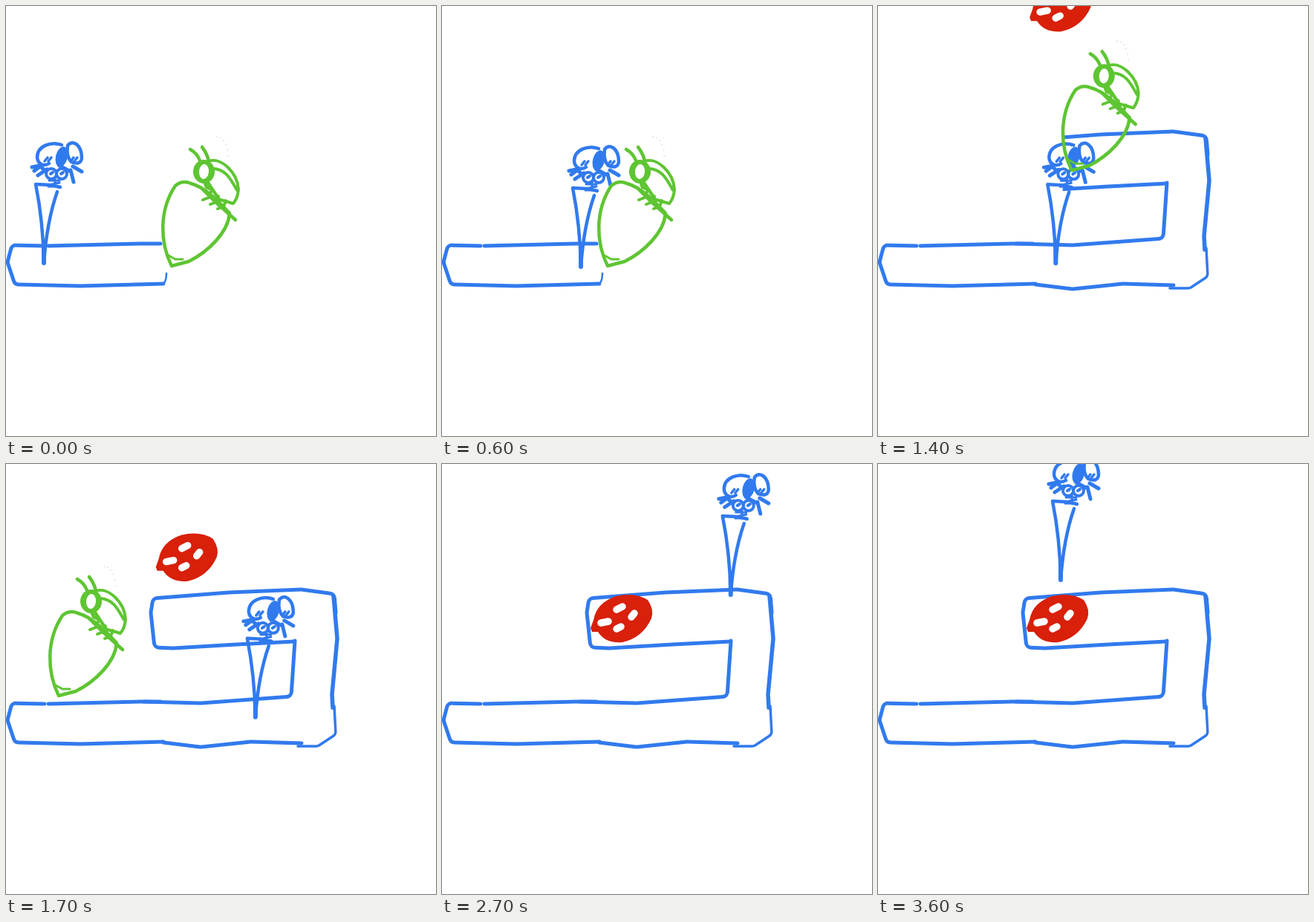
These frames come from a looping animation (579x579 px, 3700 ms). An HTML page with a canvas:

```html
<!DOCTYPE html>
<html lang="en">
<head>
<meta charset="utf-8">
<title>Bug, fly and pipe</title>
<style>
html, body { margin: 0; width: 100%; height: 100%; overflow: hidden; background: #fff; }
canvas { display: block; }
</style>
</head>
<body>
<canvas id="stage" width="579" height="579"></canvas>
<script>
const SIZE = 579, STEP = 100, STEPS = 37;
const BLUE = '#317aee', GREEN = '#5ec532', RED = '#d8200a', WHITE = '#fff';
const ctx = document.getElementById('stage').getContext('2d');

// Each leg is a Bezier curve through its control points, ending at step `end`.
const flyLegs = [
  { end: 6, curve: [[0, 0], [45, -85], [90, 85], [136, 5]] },
  { end: 12, curve: [[136, 5], [124, 4]] },
  { end: 18, curve: [[124, 4], [317, -7]] },
  { end: 24, curve: [[317, -7], [378, -36], [366, -96]] },
  { end: 30, curve: [[366, -96], [354, -231], [277, -122]] },
  { end: 36, curve: [[277, -122], [195, -190]] }
];
const bugLegs = [
  { end: 6, curve: [[0, 0]] },
  { end: 11, curve: [[0, 0], [230, 20], [183, -147]] },
  { end: 17, curve: [[183, -147], [60, -165], [-152, -38]] },
  { end: 20, curve: [[-152, -38], [-197, 124], [-250, 420]] }
];
const ballLegs = [
  { end: 13, curve: [[3, -165]] },
  { end: 19, curve: [[3, -165], [-2, 82]] }
];

const mix = (a, b, k) => a + (b - a) * k;

function bezier(points, k) {
  while (points.length > 1) {
    points = points.slice(1).map(([x, y], i) => [mix(points[i][0], x, k), mix(points[i][1], y, k)]);
  }
  return points[0];
}

function position(legs, step) {
  let start = 0;
  for (const { end, curve } of legs) {
    if (step <= end) return bezier(curve, (step - start) / (end - start));
    start = end;
  }
  return legs[legs.length - 1].curve.slice(-1)[0];
}

function stroke(path, color, width) {
  ctx.strokeStyle = color;
  ctx.lineWidth = width;
  ctx.stroke(path);
}

const line = (d, color, width = 4.5) => stroke(new Path2D(d), color, width);

// A polyline with softened corners
function tube(points, width = 5, radius = 7) {
  const path = new Path2D();
  path.moveTo(...points[0]);
  for (let i = 1; i < points.length - 1; i++) path.arcTo(...points[i], ...points[i + 1], radius);
  path.lineTo(...points[points.length - 1]);
  stroke(path, BLUE, width);
}

function oval(x, y, rx, ry, color, turn = 0) {
  ctx.fillStyle = color;
  ctx.beginPath();
  ctx.ellipse(x, y, rx, ry, turn, 0, Math.PI * 2);
  ctx.fill();
}

function placed([x, y], draw) {
  ctx.save();
  ctx.translate(x, y);
  draw();
  ctx.restore();
}

function clipped(x, y, width, draw) {
  ctx.save();
  ctx.beginPath();
  ctx.rect(x, y, width, SIZE);
  ctx.clip();
  draw();
  ctx.restore();
}

function drawBase() {
  tube([[208, 320], [180, 320], [57, 323]]);
  tube([[52, 323], [8, 322], [2, 345], [12, 375], [100, 377], [212, 374]]);
}

function drawElbow() {
  tube([[186, 320], [262, 322], [384, 313], [389, 238]]);
  tube([[212, 375], [262, 381], [330, 374], [398, 376]]);
  tube([[393, 380], [420, 380], [444, 364], [442, 326]], 3.5);
  tube([[440, 328], [439, 310], [446, 235], [441, 178]], 5.5);
}

const drawRiser = () => tube([[389, 238], [384, 200], [384, 172], [396, 170]]);

const drawTop = () => tube([[444, 200], [442, 175], [397, 169], [300, 173], [198, 181],
  [195, 200], [200, 247], [225, 248], [310, 243], [388, 239]]);

// The pipe grows behind the bug.
function drawPipe(step, [x, y]) {
  drawBase();
  if (step <= 6) {
    line('M212 374Q216 370 216 360', BLUE, 2.5);
  } else if (step <= 12) {
    clipped(0, y + 310, 212 + x * 1.35, () => { drawElbow(); drawRiser(); });
  } else {
    drawElbow();
    clipped(x + 211, 0, SIZE, drawTop);
  }
}

function drawFly() {
  line('M73 244L60 241L40 240Q50 290 51 346Q55 290 69 250', BLUE);
  line('M51 320V346', BLUE, 6);
  line('M75 187C61 182 42 188 42 204C43 214 52 216 58 212', BLUE);
  line('M83 188C90 179 102 187 102 205C101 212 95 213 88 210C82 204 82 195 83 188', BLUE);
  oval(75, 203, 8, 14, BLUE, 0.25);
  for (const x of [52, 57, 87, 92]) line(`M${x} 209l4 -5`, BLUE, 3.5);
  for (const x of [61, 75]) {
    line(`M${x - 7} 226a7 7 0 1 1 14 0a7 7 0 1 1 -14 0m6 0l3 -2`, BLUE, 4);
  }
  line('M35 217L45 215L52 221M38 222L46 216M43 228L55 220', BLUE, 5);
  line('M90 216L102 223M87 221L91 237M72 215L85 222', BLUE, 5);
  line('M58 235H72M62 240L72 238M57 243H72M66 231V239', BLUE, 3);
}

function drawBug() {
  line('M228 242Q238 234 249 239C268 244 285 262 301 279C299 305 272 331 246 344L223 350C207 318 206 275 228 242Z', GREEN);
  line('M219 336L228 341H238', GREEN, 3);
  line('M267 236L270 244L277 247M264 246L280 262L309 288M272 238L288 262', GREEN);
  for (let i = 0; i < 3; i++) line(`M${265 + 10 * i} ${261 + 6 * i}l8 -3l3 -8`, GREEN, 4);
  line('M273 209C290 203 312 225 313 247Q312 259 306 266L289 261M278 219C295 219 302 232 311 248', GREEN, 4);
  line('M248 193Q257 198 261 208M264 190Q271 199 273 209', GREEN);
  oval(266.5, 223, 14.5, 16, GREEN);
  oval(266.5, 223, 6.5, 10, WHITE, 0.1);
  for (let a = 0; a < 1.6; a += 0.3) {
    line(`M${284 + 15 * Math.sin(a)} ${204 - 28 * Math.cos(a)}h1`, '#dde3dc', 1.5);
  }
}

function drawBall() {
  ctx.fillStyle = RED;
  ctx.fill(new Path2D('M202 139L206 128Q210 105 236 96Q262 90 279 101Q288 114 284 126Q272 152 245 158Q222 160 212 144L204 144Z'));
  line('M237 114L245 110M257 124L261 119M216 132L226 130M237 140L243 137', WHITE, 9.5);
}

function frame(now) {
  const step = Math.floor(now / STEP) % STEPS;
  const bug = position(bugLegs, step);
  ctx.fillStyle = WHITE;
  ctx.fillRect(0, 0, SIZE, SIZE);
  ctx.lineCap = ctx.lineJoin = 'round';
  drawPipe(step, bug);
  placed(position(ballLegs, step), drawBall);
  placed(position(flyLegs, step), drawFly);
  placed(bug, drawBug);
  requestAnimationFrame(frame);
}
requestAnimationFrame(frame);
</script>
</body>
</html>
```
